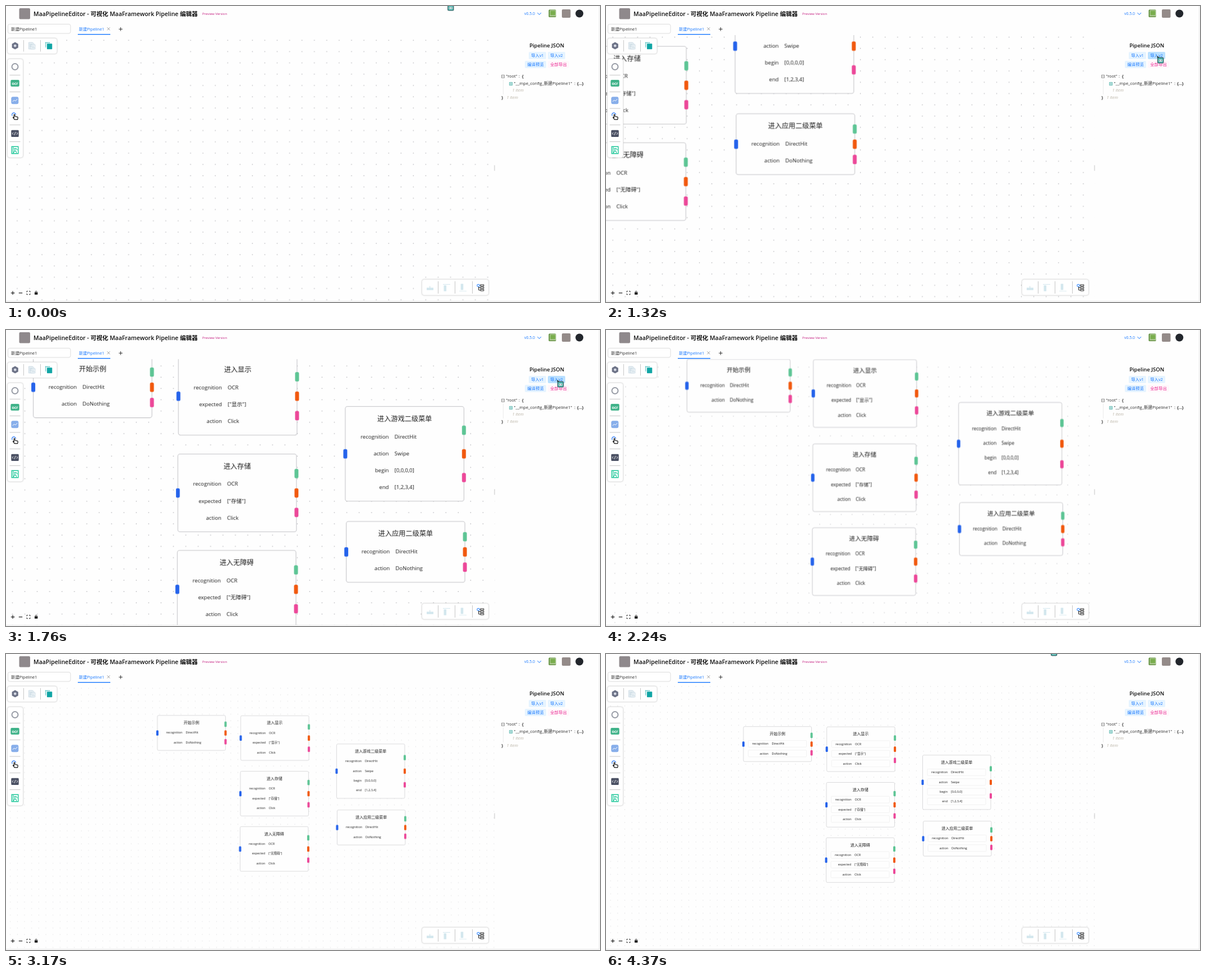
Animation, 1059 px wide and 529 px high, one loop 4.45 s. Source, as an HTML page:

```html
<!DOCTYPE html>
<html lang="zh">
<head>
<meta charset="utf-8">
<title>MaaPipelineEditor</title>
<style>
html, body { margin: 0; width: 100%; height: 100%; overflow: hidden; background: #fefefe; }
svg { display: block; width: 1059px; height: 529px; }
text { font: 7.4px "Open Sans", "Noto Sans CJK SC", "Noto Sans CJK JP", sans-serif; fill: #2b2b2b; white-space: pre; }
.bold { font-weight: 600; fill: #111; }
.blue { fill: #1677ff; }
.pink { fill: #eb2f96; }
.mid { text-anchor: middle; }
.end { text-anchor: end; }
.hint { font-style: italic; fill: #bab4a6; }
.line { fill: none; stroke: #222; stroke-width: 1.2; }
.rule { stroke: #c6c6c6; stroke-width: 1; }
.panel { fill: #fff; stroke: #e2e2e2; filter: drop-shadow(0 0 1px #0002); }
.pale { fill: #d3e7ee; }
.node { fill: #fefefe; stroke: #c3c3c7; stroke-width: .6; }
.field { fill: none; stroke: #ededed; stroke-width: .7; }
.name { font-size: 7px; fill: #1c1c1c; }
.prop { font-size: 5.5px; fill: #1c1c1c; }

#view, #nodes, #cursor, #hover, .field { animation: 4450ms linear infinite; }
#view { animation-name: view; }
#nodes { animation-name: nodes; }
#cursor { animation-name: cursor; }
#hover { animation-name: hover; }
.field { animation-name: field; }

/* pan to the pasted graph, four wheel notches out, then a drag */
@keyframes view {
  0%, 25.78% { transform: translate(-789px, -342px) scale(1.741); animation-timing-function: cubic-bezier(.65, 0, .35, 1); }
  40.07% { transform: translate(-377.5px, -177.7px) scale(1.741); animation-timing-function: step-end; }
  50.29% { transform: translate(-227.2px, -144.5px) scale(1.516); animation-timing-function: step-end; }
  51.19% { transform: translate(-96.3px, -115.6px) scale(1.3195); animation-timing-function: step-end; }
  52.99% { transform: translate(17.6px, -90.4px) scale(1.149); animation-timing-function: step-end; }
  53.89%, 63.7% { transform: translate(116.6px, -68.5px) scale(1); animation-timing-function: cubic-bezier(.4, 0, .7, .8); }
  71.24% { transform: translate(25px, -20px) scale(1); animation-timing-function: cubic-bezier(.3, .45, .6, 1); }
  75.73%, 100% { transform: translate(0, 0) scale(1); }
}
@keyframes nodes {
  0% { opacity: 0; animation-timing-function: step-end; }
  26.02%, 100% { opacity: 1; }
}
@keyframes field {
  0% { opacity: 0; animation-timing-function: step-end; }
  78.38%, 100% { opacity: 1; }
}
@keyframes hover {
  0%, 44.9% { fill: #e6f4ff; animation-timing-function: step-end; }
  17.5% { fill: #bae0ff; animation-timing-function: step-end; }
  100% { fill: #e6f4ff; }
}
/* the pointer is not visible over the canvas */
@keyframes cursor {
  0% { transform: translate(786px, -5px); animation-timing-function: cubic-bezier(.35, .2, .7, .85); }
  11.69% { transform: translate(922px, 52px); animation-timing-function: cubic-bezier(.25, .4, .5, 1); }
  22.47%, 44.27% { transform: translate(982px, 89px); }
  48.2% { transform: translate(866px, 82px); animation-timing-function: step-end; }
  48.21% { transform: translate(-60px, -60px); animation-timing-function: step-end; }
  82.87% { transform: translate(859px, 40px); }
  94.61% { transform: translate(809px, -9px); }
  98.2% { transform: translate(792px, -10px); animation-timing-function: step-end; }
  100% { transform: translate(786px, -5px); }
}
</style>
</head>
<body>
<svg viewBox="0 0 1059 529">
  <defs>
    <clipPath id="pane"><rect y="52" width="872" height="475"/></clipPath>
    <pattern id="dots" x="458.25" y="191.1" width="12.68" height="11.58" patternUnits="userSpaceOnUse">
      <circle cx="6.34" cy="5.79" r=".38" fill="#8d8d94"/>
    </pattern>
  </defs>

  <g clip-path="url(#pane)">
    <g id="view">
      <rect x="-300" y="-300" width="1900" height="1500" fill="url(#dots)"/>
      <g id="nodes"></g>
    </g>
  </g>

  <!-- header -->
  <rect x="23.5" y="4" width="19.5" height="19.5" rx="2" fill="#8f898c"/>
  <text class="bold" x="49" y="17.5" style="font-size:10.5px">MaaPipelineEditor - 可视化 MaaFramework Pipeline 编辑器</text>
  <text x="350" y="16" style="font-size:6px;fill:#c41d7f">Preview Version</text>
  <text class="blue" x="924" y="16.2" style="font-size:6.9px">v0.5.0</text>
  <path class="line" d="M947.5 12l3.3 3.6 3.3-3.6" style="stroke:#1677ff;stroke-width:1"/>
  <rect x="967.5" y="6.5" width="13" height="13.5" rx="1.5" fill="#5f8f3a"/>
  <path d="M970 8h10v9h-10zM969 18h11" fill="#79ad4d" stroke="#e4ecd8" stroke-width=".7"/>
  <rect x="991" y="6" width="15.5" height="15" rx="2" fill="#948b89"/>
  <circle cx="1022.3" cy="13.5" r="7" fill="#22262c"/>

  <!-- file name and tabs -->
  <rect x="3.5" y="32.5" width="111.5" height="16.5" rx="3" fill="#fff" stroke="#dcdcdc"/>
  <text x="9" y="43.8">新建Pipeline1</text>
  <text class="blue" x="130" y="43.8" style="font-size:7.2px">新建Pipeline1</text>
  <path class="line" d="M180.3 38.3l5 5m0-5l-5 5" style="stroke:#888;stroke-width:.8"/>
  <rect x="128" y="50" width="58" height="1.4" fill="#1677ff"/>
  <path class="line" d="M201.2 41.3h6.6m-3.3-3.3v6.6" style="stroke-width:.9"/>

  <!-- top toolbar -->
  <rect class="panel" x="2.5" y="57.5" width="88.5" height="28" rx="4"/>
  <path class="rule" d="M31.5 61v20.5M61.5 61v20.5"/>
  <path d="M16.2 64.6l5.6 3.2v6.6l-5.6 3.2-5.6-3.2v-6.6z" fill="#6d7387"/>
  <circle cx="16.2" cy="71.1" r="2.4" fill="#d5d9e4"/>
  <path d="M40.5 65h7l2.5 2.5v9.5h-9.5z" fill="#e3ecf1" stroke="#c9d9e2" stroke-width=".8"/>
  <path d="M44 69h8v8h-8z" fill="#eef4f7" stroke="#c9d9e2" stroke-width=".8"/>
  <path d="M42 69h5M42 72h8M46 74.5h5" stroke="#bfd2dc" stroke-width=".8"/>
  <path d="M70.8 73.5v-8h8" fill="none" stroke="#13a8a8" stroke-width="1.3" stroke-dasharray="1.6 1"/>
  <rect x="73" y="67.2" width="9.3" height="10" rx=".8" fill="#11a5a5"/>

  <!-- node palette -->
  <rect class="panel" x="2.5" y="94.5" width="28" height="176.5" rx="4"/>
  <path class="rule" d="M6.5 123.5h19M6.5 153.5h19M6.5 183h19M6.5 212.5h19M6.5 242.5h19"/>
  <circle cx="16" cy="108.5" r="5.5" fill="none" stroke="#979ba5" stroke-width="2"/>
  <rect x="8.3" y="132" width="15.4" height="12" rx="2" fill="#41b38a"/>
  <text class="mid" x="16" y="140.6" style="font-size:7px;font-weight:700;fill:#fff">ocr</text>
  <rect x="9.3" y="162.3" width="13" height="13" rx="3" fill="#87aeea"/>
  <path class="line" d="M11.8 171l2.8-3 2 2 3.6-3.8" style="stroke:#fff;stroke-width:1"/>
  <path class="line" d="M11.4 196.5a3.4 3.4 0 1 1 6-2.4" style="stroke:#2f7cf6"/>
  <path d="M14.2 194.2c1-.7 1.6.1 1.7.8l.4 2.5 3.7.6c1 .3 1.4 1 1.2 2l-.6 2.8h-5.4l-2.8-3.6c.5-.9 1.3-.7 2 0z" fill="#fff" stroke="#111" stroke-width="1.2"/>
  <rect x="9.3" y="221.8" width="13.4" height="12.2" rx="1.5" fill="#494f62"/>
  <path class="line" d="M13.2 225.8l-2 2.1 2 2.1m5.6-4.2l2 2.1-2 2.1m-2-5l-1.6 5.8" style="stroke:#fff;stroke-width:.9"/>
  <path d="M10.2 251.2h11.6v12.6h-11.6z" fill="#fff" stroke="#1fc79a" stroke-width="1.4"/>
  <path class="line" d="M12.7 252v11M14 254.8h4.3l2 2.6m-4-2.2l-.8 3.4 2.8 1.7.3 2.6m-3-4.2l-2 3.8" style="stroke:#1fc79a"/>

  <!-- zoom controls -->
  <path class="line" d="M8.8 512.8h6.6m-3.3-3.3v6.6M22.8 512.8h6.4"/>
  <path class="line" d="M37 511.5v-1.8h1.8m2.4 0H43v1.8m0 2.4v1.8h-1.8m-2.4 0H37v-1.8" style="stroke-width:1"/>
  <rect x="51" y="511.8" width="5.4" height="4" rx=".6" fill="#111"/>
  <path class="line" d="M52.2 512v-1a1.5 1.5 0 0 1 3 0v1" style="stroke-width:.9"/>

  <!-- align toolbar -->
  <rect class="panel" x="741.5" y="488.5" width="119" height="28.5" rx="4"/>
  <path class="rule" d="M770.5 492v22M800.5 492v22M831.5 492v22"/>
  <path class="pale" d="M750 503.5h12v4.2h-12zM755 500.5h1.4v3H755zM779 497h13v.9h-13zM780.5 499.2h4.6v10.6h-4.6zM810.7 496.5h4.6v11h-4.6zM808 509.2h13v.9h-13z"/>
  <path class="line" d="M845.8 498h6v2.6h-6zM845.8 502.2h6v2.6h-6zM845.8 506.4h6v2.6h-6zM842.6 501.5v6.2h3M842.6 503.5h3" style="stroke-width:1"/>
  <rect x="840" y="497.7" width="4.2" height="3.6" rx=".6" fill="#fff" stroke="#1677ff"/>

  <!-- JSON panel -->
  <text class="bold mid" x="964.2" y="73.6" style="font-size:9.5px">Pipeline JSON</text>
  <rect x="932" y="82" width="31" height="13" rx="2" fill="#e6f4ff"/>
  <rect id="hover" x="966" y="82" width="31" height="13" rx="2" fill="#e6f4ff"/>
  <rect x="925" y="98" width="38" height="13" rx="2" fill="#e6f4ff"/>
  <rect x="966" y="98" width="38" height="13" rx="2" fill="#fff7fb"/>
  <text class="blue mid" x="947.5" y="91.3">导入v1</text>
  <text class="blue mid" x="981.5" y="91.3">导入v2</text>
  <text class="blue mid" x="944" y="107.3">编译预览</text>
  <text class="pink mid" x="985" y="107.3">全部导出</text>
  <path class="line" d="M883.5 123.4h5v5h-5zM884.6 125.9h2.8" style="stroke:#777;stroke-width:.8"/>
  <path class="line" d="M897.6 136.6h5v5h-5zM898.7 139.1h2.8m-1.4-1.4v2.8" style="stroke:#2aa198;stroke-width:.8"/>
  <path d="M886.5 131v27" stroke="#ebebeb"/>
  <text x="891.5" y="128.4">"root"</text>
  <text x="914" y="128.4">:</text>
  <text class="bold" x="919.7" y="128.4">{</text>
  <text x="905.6" y="141.4" style="font-size:7.5px">"__mpe_config_新建Pipeline1"</text>
  <text x="1013" y="141.4">:</text>
  <text class="bold" x="1018" y="141.4">{...}</text>
  <text class="hint" x="902.5" y="153.4">1 item</text>
  <text class="bold" x="883.5" y="166.4">}</text>
  <text class="hint" x="892.5" y="166.4">1 item</text>
  <path d="M871 284.5v10" stroke="#c4c4c4"/>
  <path d="M1057.5 0v527.5M0 527.5h1058" fill="none" stroke="#e6e6e6"/>

  <g id="cursor">
    <path d="M0 0l1 5 1.4-2 2.4-.6z" fill="#2c4448"/>
    <rect x="1.6" y="3.4" width="10.2" height="9.6" rx="1.6" fill="#4bb5ae" stroke="#2f5256" stroke-width="1.1"/>
    <rect x="3.4" y="6.4" width="6.6" height="4" rx="1" fill="#dff2f1"/>
    <path d="M5 7.4v2M8.4 7.4v2" stroke="#2c4448"/>
  </g>
</svg>

<script>
const NODE_W = 121.5, ROW = 17.35;
const root = document.getElementById('nodes');

function add(tag, attrs, text) {
  const el = document.createElementNS('http://www.w3.org/2000/svg', tag);
  for (const key in attrs) el.setAttribute(key, attrs[key]);
  if (text) el.textContent = text;
  root.append(el);
}

function port(x, y, fill) {
  add('rect', { x: x - 2, y: y - 4.8, width: 4, height: 9.6, rx: 1.5, fill });
}

function node(x, y, title, props) {
  const rows = Object.entries(props);
  const h = 27.8 + rows.length * ROW;
  add('rect', { class: 'node', x, y, width: NODE_W, height: h, rx: 2.2 });
  add('text', { class: 'name mid', x: x + NODE_W / 2, y: y + 15.2 }, title);
  rows.forEach(([key, value], i) => {
    const base = y + 32.7 + i * ROW;
    add('rect', { class: 'field', x: x + 8.5, y: base - 8, width: 104, height: 12, rx: 1.5 });
    add('text', { class: 'prop end', x: x + 44.6, y: base }, key);
    add('text', { class: 'prop', x: x + 50.4, y: base }, value);
  });
  port(x, y + h / 2, '#2563eb');
  ['#5ec595', '#f1590f', '#ec4899'].forEach((fill, i) => port(x + NODE_W, y + h * (i + 1) / 4, fill));
}

const ocr = word => ({ recognition: 'OCR', expected: `["${word}"]`, action: 'Click' });
const idle = { recognition: 'DirectHit', action: 'DoNothing' };

node(245, 129.7, '开始示例', idle);
node(393.6, 130.2, '进入显示', ocr('显示'));
node(393, 229.5, '进入存储', ocr('存储'));
node(392.5, 328.4, '进入无障碍', ocr('无障碍'));
node(564.5, 180.7, '进入游戏二级菜单', { recognition: 'DirectHit', action: 'Swipe', begin: '[0,0,0,0]', end: '[1,2,3,4]' });
node(565.5, 298.7, '进入应用二级菜单', idle);
</script>
</body>
</html>
```
